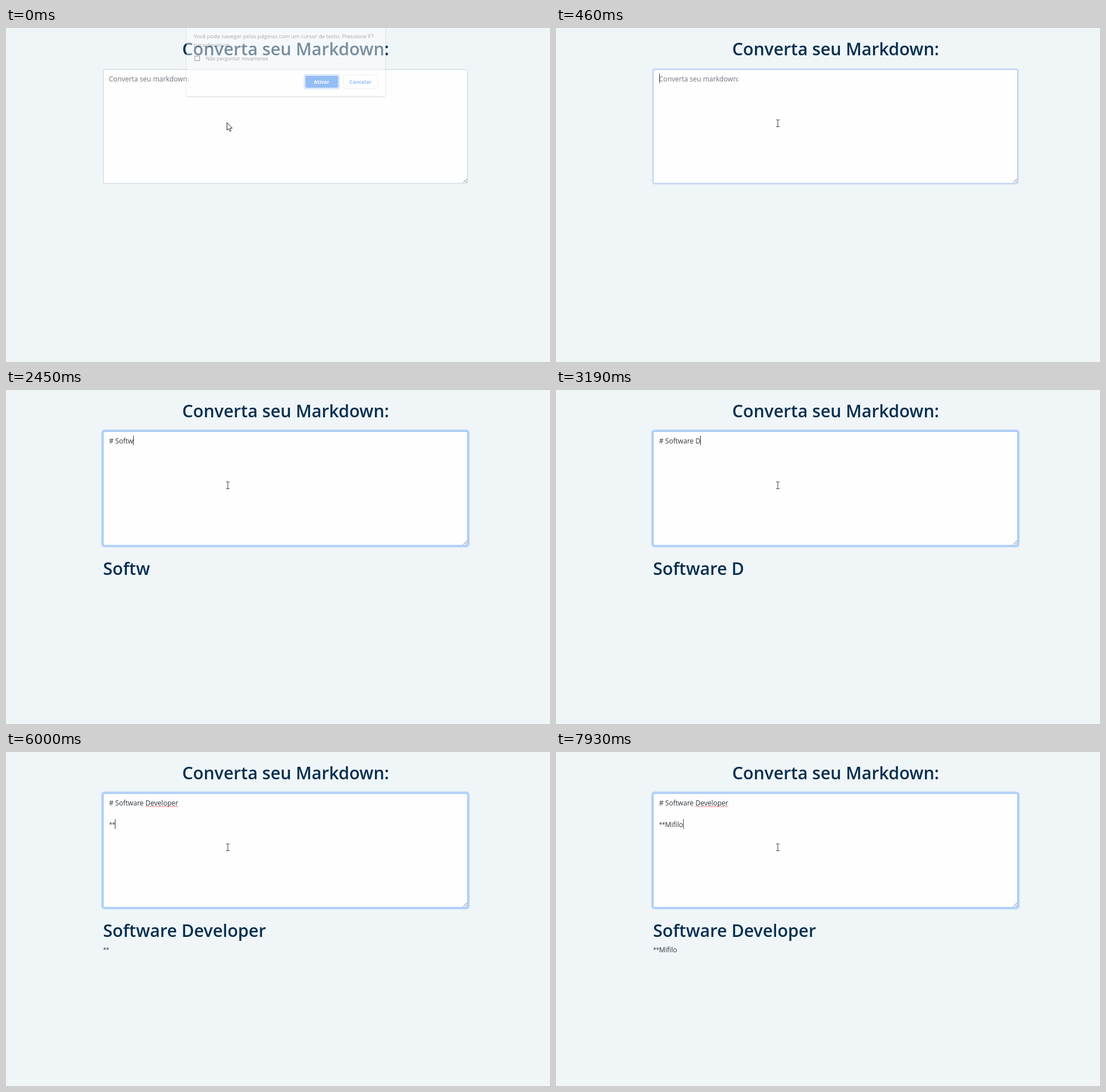
Write an HTML page that moves like this. It is 954 px wide and 587 px high and loops after 8 s.

```html
<!DOCTYPE html>
<html lang="pt">
<head>
<meta charset="utf-8">
<style>
  html, body { margin: 0; width: 100%; height: 100%; overflow: hidden; background: #f0f5f8; }
  svg { display: block; width: 954px; height: 587px; }
  text { font-family: "Open Sans", "Noto Sans", sans-serif; white-space: pre; }
  .head { font-size: 30.15px; font-weight: 600; fill: #052f4f; }
  .body { font-size: 12.1px; letter-spacing: -.02px; fill: #2f353b; }
  .hint { fill: #6c757d; }
  .star { font-size: 10px; letter-spacing: -.2px; baseline-shift: 1px; }
  .note { font-size: 9.5px; fill: #4a4e53; }
  .button { font-size: 8.8px; font-weight: 700; text-anchor: middle; }
</style>
</head>
<body>
<svg viewBox="0 0 954 587">
  <defs>
    <filter id="shade" x="-10%" y="-20%" width="120%" height="140%">
      <feDropShadow dx="0" dy="1" stdDeviation="1.6" flood-color="#000" flood-opacity=".4"/>
    </filter>
  </defs>
  <rect width="954" height="587" fill="#f0f5f8"/>
  <text class="head" x="490.4" y="47.7" text-anchor="middle">Converta seu Markdown:</text>

  <rect id="ring" fill="#b8d3f7"/>
  <rect id="box" x="170.5" y="73" width="639" height="200" rx="2.5" fill="#fefefe"/>
  <path d="M802 271.5l6.5-6.5M806 271.5l2.5-2.5" stroke="#6b6b6b" fill="none"/>

  <text id="hint" class="body hint" x="180.5" y="94">Converta seu markdown:</text>
  <text id="line1" class="body" x="180.7" y="94"></text>
  <text id="line3" class="body" x="180.7" y="132"><tspan class="star"></tspan><tspan></tspan></text>
  <path id="wave" fill="none" stroke="#e5484d" stroke-width=".9"/>
  <rect id="caret" width="1" height="17" fill="#343b42"/>

  <text id="title" class="head" x="170.2" y="324.7"></text>
  <text id="para" class="body" x="170.2" y="352"><tspan class="star"></tspan><tspan></tspan></text>
  <circle id="bullet" cx="183.7" cy="347.7" r="2.1" fill="#2f353b"/>

  <g id="dialog">
    <rect x="316.5" y="-8" width="348.5" height="127.5" rx="2.5" fill="#fff" filter="url(#shade)"/>
    <text class="note" x="329" y="17.5">Você pode navegar pelas páginas com um cursor de texto. Pressione F7</text>
    <text class="note" x="329" y="33">para desativar.</text>
    <rect x="331" y="49.5" width="8.5" height="8" fill="none" stroke="#4a4e53" stroke-width="1.2"/>
    <text class="note" x="350.5" y="57" style="font-size:8.8px">Não perguntar novamente</text>
    <rect x="522.5" y="81.5" width="62.5" height="26" rx="3" fill="#8fb9f4"/>
    <rect x="524.2" y="83.2" width="59" height="22.6" rx="2" fill="#fff"/>
    <rect x="525" y="84" width="57.5" height="21" rx="2" fill="#1a73e8"/>
    <text class="button" x="553.5" y="97.5" fill="#fff">Ativar</text>
    <rect x="591" y="82.5" width="61" height="24" rx="3" fill="none" stroke="#dadce0"/>
    <text class="button" x="621.5" y="97.5" fill="#1a73e8">Cancelar</text>
  </g>

  <path id="arrow" d="M387.5 166.5v13.2l3-2.8 2.1 4.6 2.1-1-2.1-4.4h4.2z" fill="#fff" stroke="#1c2030" stroke-width="1"/>
  <path id="beam" d="M386 161.5h2.2l.8.7.8-.7h2.2M389 162v11M386 173.5h2.2l.8-.7.8.7h2.2" fill="none" stroke="#3c4a5a" stroke-width="1.1"/>
</svg>
<script>
  const LOOP = 8000, FOCUS = 390, BLINK = 530;
  const $ = id => document.getElementById(id);
  const set = (el, attrs) => { for (const k in attrs) el.setAttribute(k, attrs[k]); };
  const show = (el, on) => { el.style.display = on ? "" : "none"; };

  // Keystrokes: runs of text spread evenly between two times.
  const keys = [];
  function type(text, from, to = from) {
    const gap = text.length > 1 ? (to - from) / (text.length - 1) : 0;
    [...text].forEach((char, i) => keys.push({ char, at: from + i * gap }));
  }
  type("#", 1190);
  type(" ", 1520);
  type("S", 1790);
  type("of", 1990, 2120);
  type("tware ", 2320, 2970);
  type("Devel", 3190, 3650);
  type("o", 3850);
  type("per", 4050, 4190);
  type("\n", 4460);
  type("\n", 4920);
  type("*", 5800);
  type("*", 6000);
  type("M", 6400);
  type("ifi", 7130, 7530);
  type("lo", 7800, 7930);

  let wave = "M245 96.5";
  for (let x = 246.5, up = true; x <= 302.5; x += 1.5, up = !up) wave += `L${x} ${up ? 95 : 96.5}`;
  set($("wave"), { d: wave });

  function setStarred(el, text) {
    const stars = text.match(/^\**/)[0];
    el.children[0].textContent = stars;
    el.children[1].textContent = text.slice(stars.length);
  }

  function drawFocus(t) {
    const p = t < FOCUS ? 0 : t < 460 ? .2 : t < 530 ? .55 : 1;
    const w = 3 * p;
    set($("ring"), { x: 170 - w, y: 72.5 - w, width: 640 + 2 * w, height: 201 + 2 * w, rx: 3 + w, opacity: p });
    const mix = (a, b) => Math.round(a + (b - a) * p);
    set($("box"), { stroke: `rgb(${mix(195, 136)},${mix(208, 186)},${mix(222, 246)})` });
    show($("arrow"), t < FOCUS);
    show($("beam"), t >= FOCUS);
  }

  function drawText(t) {
    const typed = keys.filter(k => k.at <= t + .01);
    const lines = typed.map(k => k.char).join("").split("\n");
    const first = lines[0], third = lines[2] || "";
    $("line1").textContent = first;
    setStarred($("line3"), third);
    show($("hint"), !typed.length);
    show($("wave"), lines.length > 1);

    $("title").textContent = first.slice(2).trimEnd();
    const isList = third === "*";
    setStarred($("para"), isList ? "" : third);
    show($("bullet"), isList);

    const row = lines.length - 1;
    const width = row === 1 ? 0 : $(row ? "line3" : "line1").getComputedTextLength();
    const last = typed.length ? typed[typed.length - 1].at : FOCUS + 10;
    set($("caret"), { x: Math.round(180.5 + width), y: 80 + 19 * row });
    show($("caret"), t >= FOCUS && t - last < BLINK);
  }

  function draw(t) {
    set($("dialog"), { opacity: t < 70 ? .46 : t < 130 ? .18 : 0 });
    drawFocus(t);
    drawText(t);
  }

  const start = performance.now();
  function tick() {
    draw((performance.now() - start) % LOOP);
    requestAnimationFrame(tick);
  }
  tick();
</script>
</body>
</html>
```
